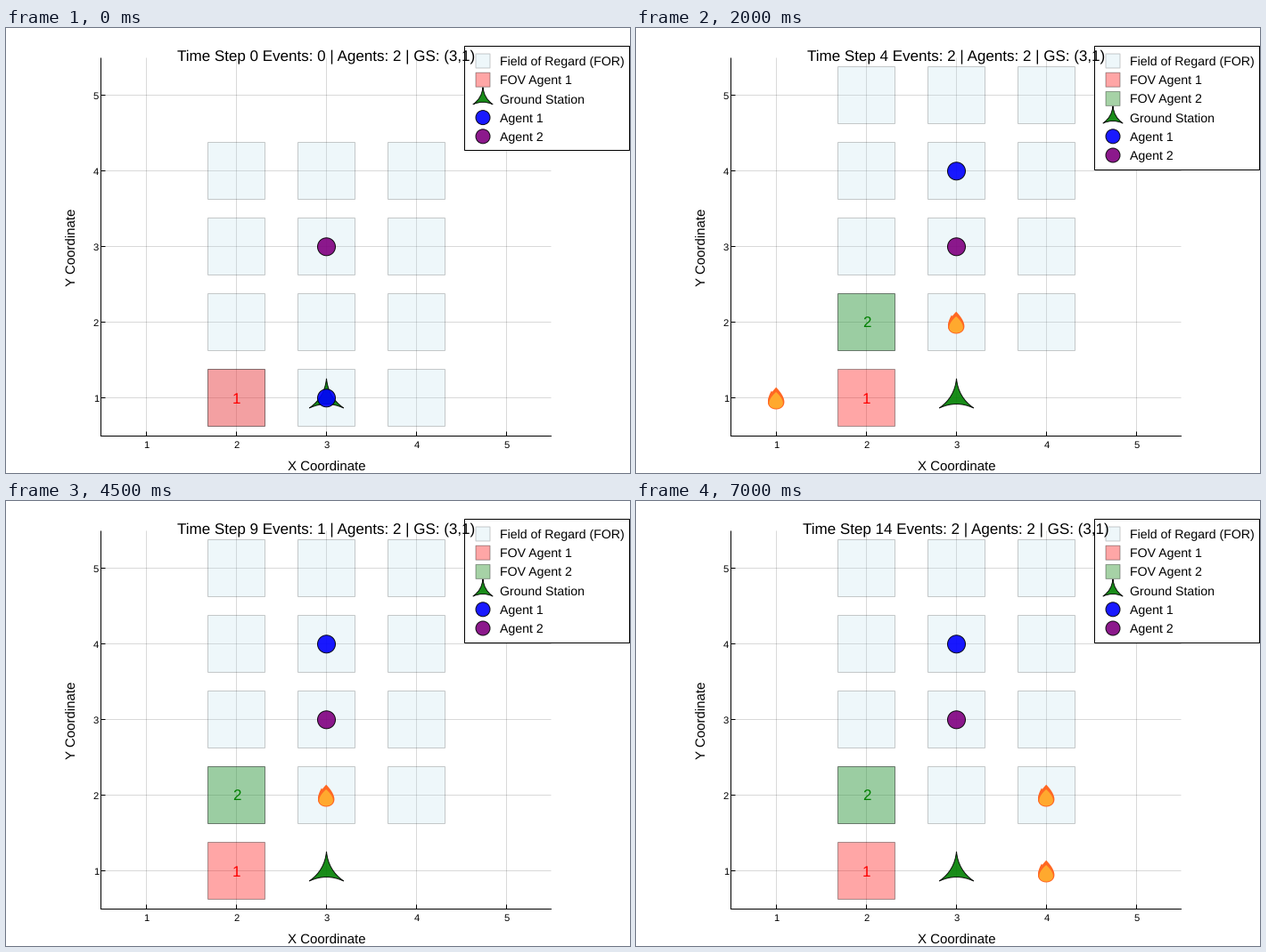
A matplotlib script for the animation above (7.5 s loop, 700x500 px).

```python
import numpy as np
import matplotlib.pyplot as plt
from matplotlib.animation import FuncAnimation
from matplotlib.patches import Circle, PathPatch, Polygon, Rectangle
from matplotlib.path import Path

W, H, DPI = 700, 500, 100
PX = 72 / DPI
STEPS, STEP_MS, CYCLE = 15, 500, 5

plt.rcParams["font.family"] = "Liberation Sans"
plt.rcParams["text.hinting"] = "none"
plt.rcParams["path.snap"] = False

AGENT_COLORS = ["blue", "purple"]
FOV_COLORS = ["red", "green"]
STATION = (3, 1)

# cell, first step, last step
FIRES = [((1, 1), 1, 5), ((3, 2), 2, 9), ((4, 2), 10, 14), ((4, 1), 12, 14)]

fig = plt.figure(figsize=(W / DPI, H / DPI), dpi=DPI, facecolor="white")
ax = fig.add_axes([0, 0, 1, 1])


def cell_xy(col, row):
    return 157.5 + 101 * (col - 1), 415.5 - 85 * (row - 1)


def agent_rows(step):
    phase = step % CYCLE
    return phase + (phase < 3), 1 + abs(phase - 2)


def add(patch):
    patch.set_zorder(1)
    ax.add_patch(patch)


def line(xs, ys, alpha=1.0):
    ax.plot(xs, ys, color="black", alpha=alpha, lw=PX, zorder=1,
            solid_capstyle="butt")


def label(x, y, text, size, color="black", ha="left", **kw):
    ax.text(x, y, text, fontsize=size * PX, color=color, ha=ha,
            va="baseline", zorder=1, **kw)


def square(x, y, half, color, alpha):
    add(Rectangle((x - half, y - half), 2 * half, 2 * half, fc=color,
                  ec="black", lw=PX, alpha=alpha))


def disc(x, y, r, color):
    add(Circle((x, y), r, fc=color, ec="black", lw=PX, alpha=0.9))


def tristar(x, y, r):
    """Three points joined by curves that bend in towards the centre."""
    k = np.arange(7)
    a, rad = k * np.pi / 3, np.where(k % 2, 0.1 * r, r)
    pts = np.column_stack([x + rad * np.sin(a), y - rad * np.cos(a)])
    path = Path(pts, [Path.MOVETO] + [Path.CURVE3] * 6)
    add(PathPatch(path, fc="green", ec="black", lw=PX, alpha=0.9,
                  joinstyle="round"))


def drop(x, top, bottom, half, color):
    """Teardrop with its tip at the top."""
    t = np.linspace(0, 2 * np.pi, 60)
    xs = x + half / 0.77 * np.sin(t) * np.sin(t / 2)
    ys = top + (bottom - top) * (1 - np.cos(t)) / 2
    add(Polygon(np.column_stack([xs, ys]), fc=color, lw=0))


def flame(x, y):
    drop(x - 0.3, y - 11.8, y + 13, 9.2, "#ff6723")
    drop(x - 5.5, y - 8, y + 10, 4, "#ff6723")
    drop(x - 0.4, y - 6.5, y + 12, 7.8, "#ffa92e")


def draw_axes():
    for i in range(1, 6):
        x, y = cell_xy(i, i)
        line([x, x], [33.5, 458.5], 0.15)
        line([106.5, 611.5], [y, y], 0.15)
    line([106.5, 106.5], [33.5, 459])
    line([106, 612], [458.5, 458.5])
    for i in range(1, 6):
        x, y = cell_xy(i, i)
        line([x, x], [453.5, 458.5])
        line([106.5, 111.5], [y, y])
        label(x, 472, str(i), 11.3, ha="center")
        label(104, y + 4.5, str(i), 11.3, ha="right")
    label(359.5, 498, "X Coordinate", 15, ha="center")
    label(79, 246.5, "Y Coordinate", 15, ha="center", rotation=90,
          rotation_mode="anchor")


def draw_legend(fov_count):
    entries = [("Field of Regard (FOR)", square, 8, "lightblue", 0.2)]
    entries += [(f"FOV Agent {i + 1}", square, 8, FOV_COLORS[i], 0.35)
                for i in range(fov_count)]
    entries += [("Ground Station", tristar, 12.7)]
    entries += [(f"Agent {i + 1}", disc, 8, color)
                for i, color in enumerate(AGENT_COLORS)]

    height = np.floor(11.5 + 21.25 * len(entries))
    add(Rectangle((514.5, 20.5), 185, height, fc="white", ec="black", lw=PX))
    for i, (text, marker, *style) in enumerate(entries):
        y = 37 + 21.2 * i
        marker(535, y, *style)
        label(554, y + 5, text, 14.15)


def draw(step):
    ax.cla()
    ax.set(xlim=(0, W), ylim=(H, 0))
    ax.axis("off")
    draw_axes()

    rows = agent_rows(step)
    in_view = {r + d for r in rows for d in (-1, 0, 1)} & set(range(1, 6))
    for row in sorted(in_view):
        for col in (2, 3, 4):
            square(*cell_xy(col, row), 32, "lightblue", 0.2)

    fov_count = 1 if step < 2 else 2
    for i in range(fov_count):
        x, y = cell_xy(2, i + 1)
        square(x, y, 32, FOV_COLORS[i], 0.35)
        label(x, y + 6, str(i + 1), 17, FOV_COLORS[i], "center")

    x, y = cell_xy(*STATION)
    tristar(x, y + 0.4, 22)
    for row, color in zip(rows, AGENT_COLORS):
        x, y = cell_xy(3, row)
        disc(x, y + 0.3, 10, color)

    burning = [cell for cell, first, last in FIRES if first <= step <= last]
    for cell in burning:
        flame(*cell_xy(*cell))

    draw_legend(fov_count)
    label(191.6 if step < 10 else 186.9, 36.5,
          f"Time Step {step} Events: {len(burning)} | Agents: 2 | GS: (3,1)",
          17)
    return []


anim = FuncAnimation(fig, draw, frames=STEPS, init_func=lambda: draw(0),
                     interval=STEP_MS, repeat=True, repeat_delay=0,
                     blit=False)
plt.show()
```
